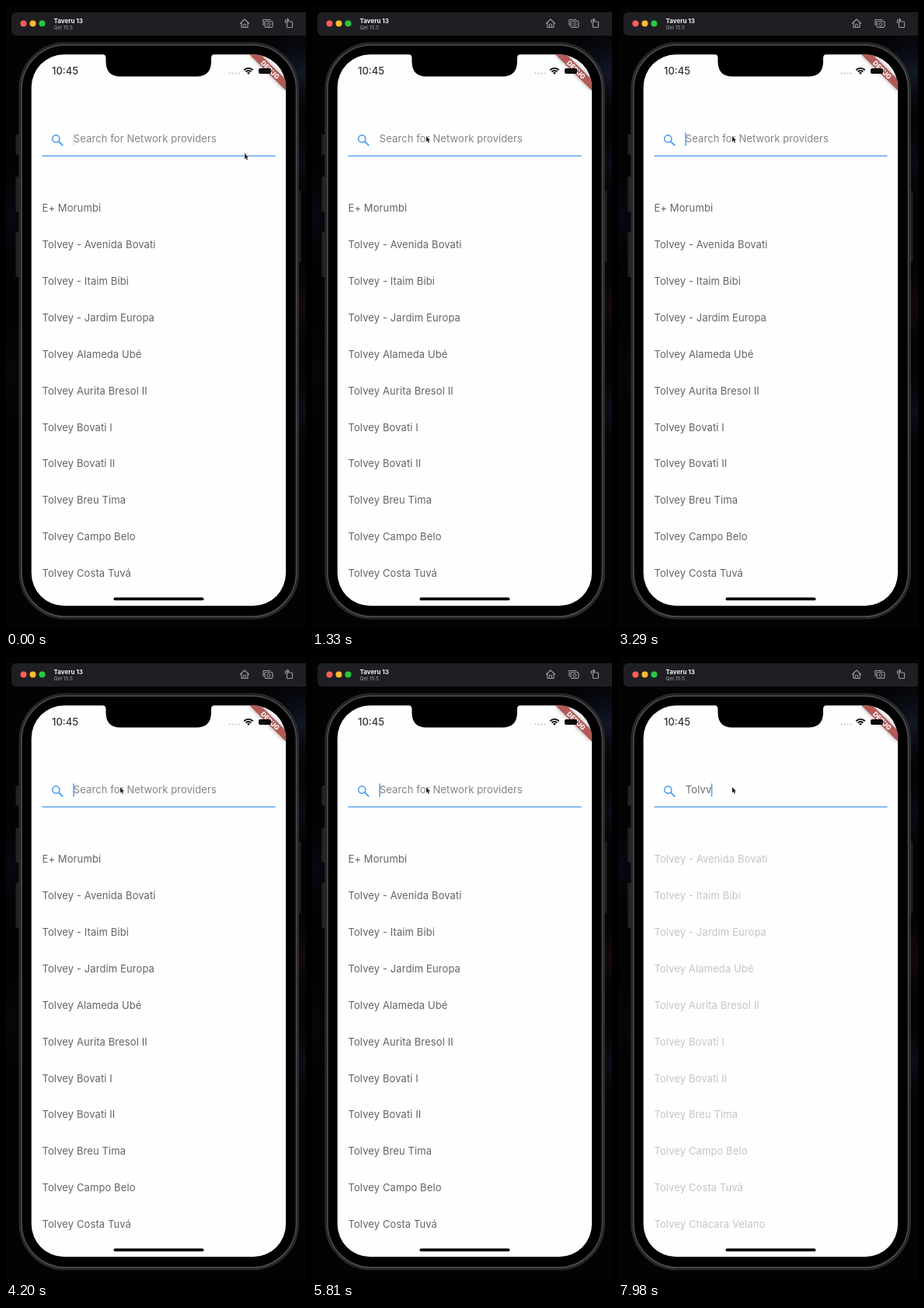
An HTML page with a canvas for the animation above (8000 ms loop, 386 by 800 pixels).

```html
<!DOCTYPE html>
<html lang="en">
<head>
<meta charset="utf-8">
<title>Provider search</title>
<style>
html, body { margin: 0; width: 100%; height: 100%; overflow: hidden; background: #000; }
canvas { display: block; width: 386px; height: 800px; }
</style>
</head>
<body>
<canvas id="stage"></canvas>
<script>
const W = 386, H = 800, LOOP = 8000, FADE = 240;
const FONT = 'Inter, Roboto, sans-serif';
const BLUE = '#55a3f2';
const canvas = document.getElementById('stage');
const dpr = window.devicePixelRatio || 1;
canvas.width = W * dpr;
canvas.height = H * dpr;
const ctx = canvas.getContext('2d');

const network = ['- Avenida Bovati', '- Itaim Bibi', '- Jardim Europa', 'Alameda Ubé',
  'Aurita Bresol II', 'Bovati I', 'Bovati II', 'Breu Tima', 'Campo Belo',
  'Costa Tuvá', 'Chácara Velano'].map(n => 'Tolvey ' + n);
const all = ['E+ Morumbi', ...network.slice(0, 10)];
const plus = ['Amorélia', 'Aurelmo Vante', 'Bortavi', 'Bovati', 'Breu Tima', 'Brumadeno',
  'Campo Belo', 'Candureiva', 'Caputio', 'Chácara Flora', 'Fontrel'].map(n => 'e+ ' + n);

// Field contents; each entry also restarts the caret blink.
const keys = [
  [-690, ''], [1690, 'e'], [2795, ''], [4400, ''],
  [5880, 'T'], [6090, 'To'], [6300, 'Tol'], [7000, 'Tolv'], [7700, 'Tolvv']
];
const swaps = [[1690, plus], [2795, all], [5900, network], [7829, []]];

const clamp = v => Math.max(0, Math.min(1, v));
const ease = v => v * v * (3 - 2 * v);

function box(x, y, w, h, r, fill) {
  ctx.beginPath();
  ctx.roundRect(x, y, w, h, r);
  if (fill) { ctx.fillStyle = fill; ctx.fill(); }
}

function outline(color, width) {
  ctx.strokeStyle = color;
  ctx.lineWidth = width;
  ctx.stroke();
}

function disc(x, y, r, fill) {
  ctx.beginPath();
  ctx.arc(x, y, r, 0, 7);
  ctx.fillStyle = fill;
  ctx.fill();
}

function poly(points, fill) {
  ctx.beginPath();
  points.forEach(([x, y]) => ctx.lineTo(x, y));
  ctx.closePath();
  if (fill) { ctx.fillStyle = fill; ctx.fill(); }
}

function line(x1, y1, x2, y2, color, width) {
  ctx.beginPath();
  ctx.moveTo(x1, y1);
  ctx.lineTo(x2, y2);
  outline(color, width);
}

function text(str, x, y, size, color, weight = 400, spacing = 0) {
  ctx.font = `${weight} ${size}px ${FONT}`;
  ctx.letterSpacing = spacing + 'px';
  ctx.fillStyle = color;
  ctx.fillText(str, x, y);
}

function glow(x, y, r, color) {
  const g = ctx.createRadialGradient(x, y, 0, x, y, r);
  g.addColorStop(0, color);
  g.addColorStop(1, 'rgba(0,0,0,0)');
  ctx.fillStyle = g;
  ctx.fillRect(x - r, y - r, 2 * r, 2 * r);
}

function wallpaper() {
  ctx.fillStyle = '#030304';
  ctx.fillRect(0, 0, W, H);
  glow(382, 85, 80, 'rgba(24,31,54,.75)');
  glow(384, 200, 70, 'rgba(14,19,36,.6)');
  glow(386, 385, 70, 'rgba(38,14,18,.6)');
  glow(386, 520, 70, 'rgba(20,22,42,.6)');
  glow(0, 270, 90, 'rgba(9,12,24,.7)');
  glow(0, 470, 90, 'rgba(14,8,13,.6)');
}

function toolbar() {
  box(7, 8, 390, 30, 6, '#1f1f23');
  ['#fe5f57', '#febc2e', '#28c840'].forEach((c, i) => disc(22.5 + 12 * i, 22.5, 4, c));
  text('Taveru 13', 61.5, 21.5, 8, '#f2f2f4', 700);
  text('Qel 15.5', 61.5, 30, 6.5, '#8d8d92', 500);

  const c = '#98989d';
  ctx.lineJoin = 'round';
  ctx.lineCap = 'round';
  ctx.beginPath();
  ctx.moveTo(301.5, 22.3);
  ctx.lineTo(307, 17);
  ctx.lineTo(312.5, 22.3);
  ctx.moveTo(303, 21.5);
  ctx.lineTo(303, 27.5);
  ctx.lineTo(311, 27.5);
  ctx.lineTo(311, 21.5);
  outline(c, 1.2);
  box(305.8, 23.3, 2.5, 4.2, 0);
  outline(c, 1);

  box(333, 19.5, 10, 7.8, 1.5);
  outline(c, 1.2);
  ctx.beginPath();
  ctx.arc(338, 23.4, 2, 0, 7);
  outline(c, 1);
  ctx.beginPath();
  ctx.moveTo(331, 24.5);
  ctx.lineTo(331, 17.5);
  ctx.lineTo(340, 17.5);
  outline(c, 1.2);

  box(361.5, 20, 7, 7.5, 1);
  outline(c, 1.2);
  ctx.beginPath();
  ctx.moveTo(359.5, 21.5);
  ctx.lineTo(359.5, 18);
  ctx.lineTo(363.5, 18);
  ctx.moveTo(362, 16.3);
  ctx.lineTo(363.8, 18);
  ctx.lineTo(362, 19.7);
  outline(c, 1.2);
}

function phone() {
  [[165, 26], [219, 45], [290, 58]].forEach(([y, h]) => box(12.5, y, 5, h, 1.5, '#222224'));
  box(375, 237, 4.5, 92, 1.5, '#1d1d1f');
  box(17.5, 47.5, 358.5, 739, 59, '#060606');
  outline('#2b2b2d', 2);
  box(19.8, 49.8, 353.9, 734.4, 57);
  outline('#4c4c4e', 1.8);
  box(22.5, 52.5, 348.5, 729, 54, '#000');
}

function notch() {
  ctx.beginPath();
  ctx.moveTo(122, 61);
  ctx.lineTo(124, 62);
  ctx.quadraticCurveTo(128.5, 62, 128.5, 67);
  ctx.lineTo(128.5, 72);
  ctx.quadraticCurveTo(129, 90.5, 147, 90.5);
  ctx.lineTo(245, 90.5);
  ctx.quadraticCurveTo(263.5, 90.5, 264, 72);
  ctx.lineTo(264, 67);
  ctx.quadraticCurveTo(264, 62, 268.5, 62);
  ctx.lineTo(270, 61);
  ctx.fillStyle = '#000';
  ctx.fill();
}

function debugBanner() {
  ctx.save();
  ctx.shadowColor = 'rgba(0,0,0,.4)';
  ctx.shadowBlur = 5 * dpr;
  poly([[313, 62], [327, 62], [360.5, 95], [360.5, 109]], '#b35a57');
  ctx.restore();
  ctx.save();
  ctx.translate(340, 82);
  ctx.rotate(Math.PI / 4);
  ctx.textAlign = 'center';
  text('DEBUG', 0, 3.1, 8.5, '#fff', 800);
  ctx.restore();
}

function statusBar() {
  text('10:45', 59, 88.3, 13, '#333', 500);
  for (let i = 0; i < 4; i++) disc(287.5 + 4 * i, 86.5, 1.1, '#c4c4c4');
  ctx.lineCap = 'butt';
  [7.6, 4.5].forEach(r => {
    ctx.beginPath();
    ctx.arc(312, 87.5, r, -Math.PI * 0.77, -Math.PI * 0.23);
    outline('#111', 1.9);
  });
  poly([[310, 85.7], [312, 84.8], [314, 85.7], [312, 88]], '#111');
  debugBanner();
  box(325, 80, 16, 7, 2, '#0b0b0b');
  box(341.8, 82, 1.2, 3, 0.5, '#555');
}

function caretAlpha(since) {
  const p = since % 1000;
  if (p > 500) return clamp(1 - (p - 500) / 250);
  return since < 1000 ? 1 : clamp(p / 250);
}

function searchField(t) {
  ctx.lineCap = 'butt';
  ctx.beginPath();
  ctx.arc(64.3, 170.5, 4.6, 0, 7);
  outline(BLUE, 1.7);
  line(67.6, 173.8, 73.3, 179.4, BLUE, 2);
  line(46.5, 192.5, 346.5, 192.5, BLUE, 1.6);

  const [when, value] = keys.filter(k => k[0] <= t).pop();
  text(value || 'Search for Network providers', 86.8, 175.2, 13,
    value ? '#6e6e6e' : '#858585', 400, 0.1);
  const x = 86.8 + (value ? ctx.measureText(value).width : 0);
  ctx.globalAlpha = caretAlpha(t - when);
  ctx.fillStyle = BLUE;
  ctx.fillRect(x - 0.5, 162.5, 1.6, 17);
  ctx.globalAlpha = 1;
}

function results(t) {
  let rows = all, alpha = 1;
  for (const [start, next] of swaps) {
    if (t < start) break;
    const p = (t - start) / FADE;
    if (p >= 1) rows = next;
    alpha = p < 1 ? 1 - p : clamp(p - 1);
  }
  ctx.globalAlpha = alpha;
  rows.forEach((row, i) => text(row, 46.5, 263.8 + 46.95 * i, 13, '#646464', 400, 0.1));
  ctx.globalAlpha = 1;
}

function pointer(t) {
  const p = ease(clamp((t - 250) / 750));
  ctx.save();
  ctx.translate(307 - 160 * p, 189 - 22 * p);
  ctx.lineJoin = 'round';
  poly([[0, 0], [0, 7.4], [1.7, 6], [2.9, 8.7], [4.1, 8.2], [2.9, 5.6], [5.1, 5.4]]);
  outline('#fff', 1.4);
  ctx.fillStyle = '#222';
  ctx.fill();
  ctx.restore();
}

function draw(t) {
  ctx.setTransform(dpr, 0, 0, dpr, 0, 0);
  wallpaper();
  toolbar();
  phone();
  ctx.save();
  box(32.7, 62.3, 327.4, 708, 42, '#fefefe');
  ctx.clip();
  statusBar();
  searchField(t);
  results(t);
  box(138.5, 759.5, 116, 3.8, 1.9, '#000');
  ctx.restore();
  notch();
  pointer(t);
}

const begin = performance.now();
function tick() {
  draw((performance.now() - begin) % LOOP);
  requestAnimationFrame(tick);
}
tick();
</script>
</body>
</html>
```
